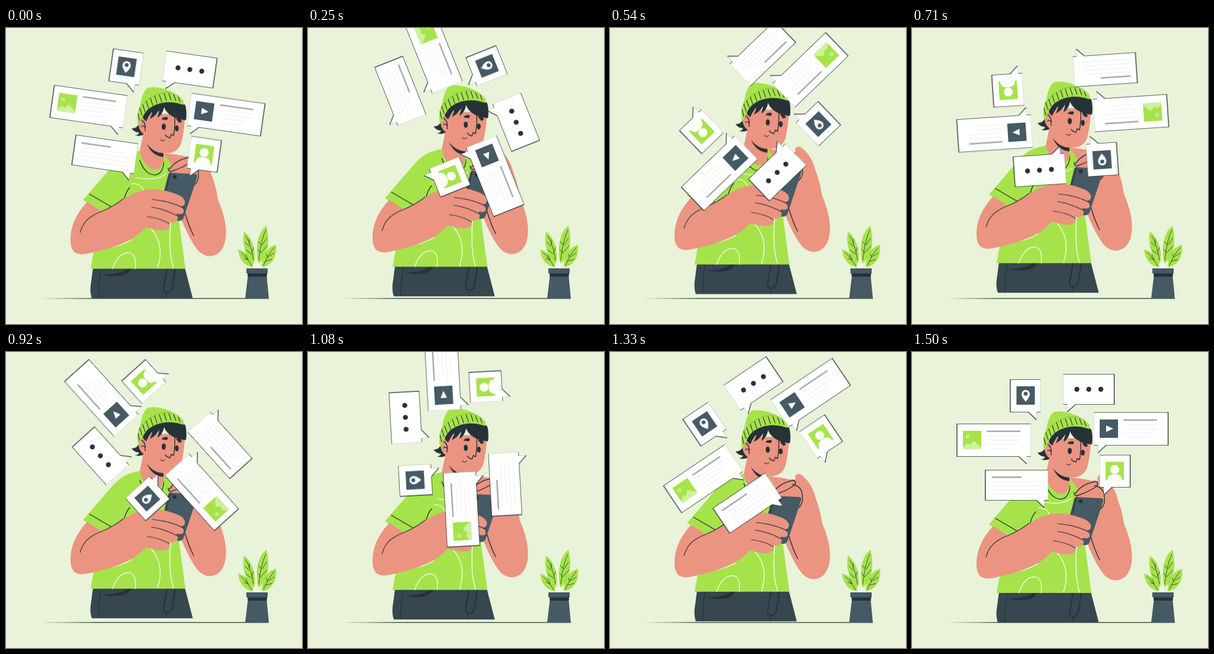
Animation of 500 by 500 pixels, one loop 1540 ms. Source, as an HTML page without scripts:

```html
<!DOCTYPE html>
<html lang="en">
<head>
<meta charset="utf-8">
<title>Chatting on the phone</title>
<style>
html, body { margin: 0; width: 100%; height: 100%; overflow: hidden; background: #e8f3d9; }
svg { display: block; width: 100vw; height: 100vh; }
.skin { fill: #eb9481; }
.green { fill: #a6e34a; }
.dark { fill: #263238; }
.slate { fill: #455a64; }
.pants { fill: #37474f; }
.white { fill: #fff; }
.ink, .chalk, .rule, .head { fill: none; stroke-linecap: round; stroke-linejoin: round; }
.ink { stroke: #263238; stroke-width: 1.1; }
.chalk { stroke: #fff; stroke-width: 1.2; }
.rule { stroke: #dedede; stroke-width: .6; }
.head { stroke: #a6a6a6; stroke-width: 2.4; stroke-linecap: butt; }
.edge { fill: #fff; stroke: #263238; stroke-width: 1.5; }
.fine { stroke-width: .8; }
.bold { stroke-width: 1.4; }
.thick { stroke-width: 2; }

/* 37 held poses per loop, the last one resting upright */
#person { animation: float 1540ms -5ms infinite; }
#bubbles { transform-origin: 254.1px 150.2px; animation: spin 1540ms -5ms infinite; }
@keyframes float {
  0% { transform: translateY(-.4px); animation-timing-function: steps(17); }
  45.946% { transform: translateY(-9.8px); animation-timing-function: steps(19); }
  97.297%, 100% { transform: translateY(0); }
}
@keyframes spin {
  0% { transform: rotate(8.1deg); animation-timing-function: steps(6); }
  16.216% { transform: rotate(68.2deg); animation-timing-function: steps(7); }
  35.135% { transform: rotate(136.1deg); animation-timing-function: steps(4); }
  45.946% { transform: rotate(176.2deg); animation-timing-function: steps(5); }
  59.459% { transform: rotate(228deg); animation-timing-function: steps(7); }
  78.378% { transform: rotate(296deg); animation-timing-function: steps(7); }
  97.296% { transform: rotate(366deg); animation-timing-function: step-end; }
  97.297%, 100% { transform: rotate(360deg); }
}
</style>
</head>
<body>
<svg viewBox="0 0 500 500">
  <defs>
    <path id="pin" d="M166 47H216.500V101H209.500V113.500L196 101H166Z"/>
    <path id="dots" d="M256 38H341.500V88H277L263 100V88H256Z"/>
    <path id="image" d="M76 122H200V176H193V188L180 176H76Z"/>
    <path id="video" d="M308 102.500H432.500V157H328L315 169.500V157H308Z"/>
    <path id="note" d="M124 200H229V250H222.500V262L210 250H124Z"/>
    <path id="user" d="M318 174.500H368.500V228H338L325 240.500V228H318Z"/>
  </defs>

  <path class="dark" d="M57 457L150 456.300H444V457.400H150Z"/>

  <g id="plant">
    <path class="chalk thick" d="M421 406L419 394M424 406L426 392M430 406L436 399"/>
    <g class="green">
      <path d="M417 404C400 401 394 389 392 374C407 379 419 389 417 404Z"/>
      <path d="M419 398C403 384 398 362 402 344C415 353 424 376 419 398Z"/>
      <path d="M426 398C420 366 427 343 440 334C446 358 444 385 426 398Z"/>
      <path d="M432 404C432 383 442 370 456 366C458 384 451 401 432 404Z"/>
    </g>
    <g class="ink fine">
      <path d="M415 402Q408 389 397 379M402 389L409 392M405 383L409 391"/>
      <path d="M418 392Q415 368 405 351M404 362L411 369M405 375L415 382M411 357V365M418 371L415 379"/>
      <path d="M427 392Q430 360 439 341M426 361L432 366M425 374L430 379M440 355L433 366M441 368L430 380"/>
      <path d="M435 401Q442 383 453 371M440 382L442 388M453 380L444 386M449 391L438 394"/>
    </g>
    <path class="slate" d="M409 415H440L444 457H404Z"/>
    <path class="dark" d="M408 414H441L440.500 420H408.500Z"/>
    <path class="slate" d="M406 406H442V414.500H406Z"/>
  </g>

  <g id="person">
    <path class="pants" d="M147 405H302L315.500 457H145C142 448 142 440 144 428Z"/>
    <path class="ink" d="M161 407Q156 432 157 456M271 447V456"/>
    <path class="ink thick" d="M272 407L266.500 438Q265 447 272 447Q279 447 281 439L286 407"/>
    <path class="dark" d="M163 417Q198 415 204 407H211Q206 418 190 419Q176 420 163 417Z"/>

    <path class="skin" d="M266 212Q290 213 313 220V212Q316 205 324 210Q342 225 347 248Q355 268 358 290Q370 318 371.500 340Q373 371 357 382Q341 391 326 378Q310 360 294 318L268 245Z"/>
    <path class="green" d="M225 208L207 213Q191 219 175 239L130 291L162 310L159 337Q148 373 143 407H303L291 318L284 238L268 214Z"/>
    <g class="chalk">
      <path d="M180 407C186 390 196 379 208 380C218 381 220 394 218 407"/>
      <path d="M160 372Q190 371 212 358M244 338C262 358 264 380 256 406M278 325C276 360 276 384 283 406"/>
      <path d="M213 263Q232 264 232 278M219 253Q253 260 270 247"/>
    </g>
    <path class="ink bold" d="M302 312Q309 336 317 351M141 281L177 302M200 288Q203 276 209 270"/>

    <path class="skin" d="M233 174L226 208C231 232 248 246 260 237Q267 230 267 211Z"/>
    <path class="ink bold" d="M226 224C233 245 249 254 260 245Q266 239 267 226"/>
    <path class="green" d="M267 213L275 224L267 240Z"/>

    <path class="dark" d="M238 196Q249 211 266 212V218Q247 217 238 196Z"/>
    <path class="dark" d="M226 160Q222 170 212 170Q217 177 225 177Q223 182 217 181Q227 185 234 179L235 160Z"/>
    <path class="skin" d="M236 146L303 145C301 169 299 184 296 195Q290 212 270 212Q243 209 232 179Q223 173 224 159Q226 147 236 153Z"/>
    <path class="ink bold" d="M229 156Q237 160 235 174M229 167Q233 164 235 169"/>
    <path class="dark" d="M231 150Q243 128 265 122Q290 118 303 131Q306 143 304 156Q290 155 280 149Q270 143 267 134Q265 146 256 152Q257 145 259 139Q253 149 243 154Q246 147 247 142Q241 148 237 158Q231 154 231 150Z"/>
    <path class="green" d="M227 130Q231 105 241 101Q249 99 267 103Q287 109 300 125Q301 130 299 130C270 119 239 130 230 151Q228 162 223 165Q219 147 227 130Z"/>
    <path d="M225 140C241 109 282 98 300 124" fill="none" stroke="#87c038"/>
    <path class="ink" d="M223 145L226 157M226 136L230 148M231 130L235 142M237 124L241 136M244 119L248 131M251 115L255 127M259 113L263 125M267 111L271 123M275 111L279 122M283 113L287 123M291 117L294 125"/>
    <g class="dark">
      <ellipse cx="266.500" cy="167" rx="3.500" ry="5.200"/>
      <ellipse cx="288.500" cy="170" rx="3.300" ry="5"/>
      <path d="M263 155Q264 150 273 151Q274 155 271 156Q266 155 263 155ZM287 154Q294 151 297 158Q295 161 292 160Q290 157 287 154Z"/>
    </g>
    <path class="ink bold" d="M285 151Q286 166 283 182L279 180L277 186Q272 185 269 181"/>
    <path class="ink" d="M261 189Q265 193 268 189"/>

    <path class="skin" d="M276 239Q283 224 306 217Q325 217 326 231V258L316 270L275 245Z"/>
    <path class="ink bold" d="M276 239Q286 224 308 219Q316 219 312 227Q299 236 281 242M281 242Q274 245 274 237M308 226Q324 228 325 245Q327 257 319 265"/>
    <path class="slate" d="M278 245L319 247Q324 247 323 252L300 321Q298 327 291 326L268 324L266 286L274 249Q275 245 278 245Z"/>
    <path class="pants" d="M278 245H282Q279 246 278 250L268 291L264 287L274 249Q275 245 278 245Z"/>
    <circle class="dark" cx="285" cy="252" r="3.200"/>

    <path class="skin" d="M137 294C117 316 108 338 109 361C110 380 120 386 140 381C175 373 215 363 236 337Q252 342 264 342Q276 341 277 334Q276 330 270 328Q289 332 290 322Q291 319 287 317L289 314Q302 317 300 308Q299 304 294 302Q304 301 302 292Q299 284 282 279Q257 270 235 274C207 279 195 296 162 310Z"/>
    <path class="ink" d="M125 346Q130 328 144 319Q153 313 162 310Q183 301 198 289M247 290Q278 293 299 304M246 303Q267 306 288 317M239 319Q262 322 276 331"/>
  </g>

  <g id="bubbles">
    <use href="#pin" class="edge"/><use href="#pin" class="white" x=".8"/>
    <path class="slate" d="M176.500 58H207.500V89H176.500Z"/>
    <path class="white" d="M192 84Q185 76 185 71A7 7 0 0 1 199 71Q199 76 192 84Z"/>
    <circle class="slate" cx="192" cy="70.500" r="3.300"/>

    <use href="#dots" class="edge"/><use href="#dots" class="white" x="-.8"/>
    <g class="dark">
      <circle cx="278.500" cy="63" r="4.200"/><circle cx="298.700" cy="63" r="4.200"/><circle cx="319" cy="63" r="4.200"/>
    </g>

    <use href="#image" class="edge"/><use href="#image" class="white" x=".8"/>
    <path class="green" d="M86 133H117V164H86Z"/>
    <g fill="#cef19e">
      <circle cx="94" cy="143" r="3.500" opacity=".7"/>
      <path d="M86 164V160L94 154L98 157L105 150L117 161V164Z"/>
    </g>
    <path class="head" d="M126.500 134H183"/>
    <path class="rule" d="M127 142H184M135 149H184M127 156H173M135 163H166"/>

    <use href="#video" class="edge"/><use href="#video" class="white" x="-.8"/>
    <path class="slate" d="M317 114H348V145H317Z"/>
    <path class="white" d="M328 124L340 129.500L328 135Z"/>
    <path class="head" d="M357.500 115H414"/>
    <path class="rule" d="M358 123H415M366 130H415M358 137H404M366 144H398"/>

    <use href="#note" class="edge"/><use href="#note" class="white" x=".8"/>
    <path class="head" d="M134.500 211.500H185"/>
    <path class="rule" d="M135 219H210M141 226H216M135 233H210M141 240H216"/>

    <use href="#user" class="edge"/><use href="#user" class="white" x="-.8"/>
    <path class="green" d="M327 185.500H358V216.500H327Z"/>
    <path class="white" d="M330 216.500Q331 206 342.500 206Q354 206 355 216.500Z"/>
    <circle cx="342.500" cy="198.500" r="8" fill="#fff" stroke="#a6e34a"/>
  </g>
</svg>
</body>
</html>
```
